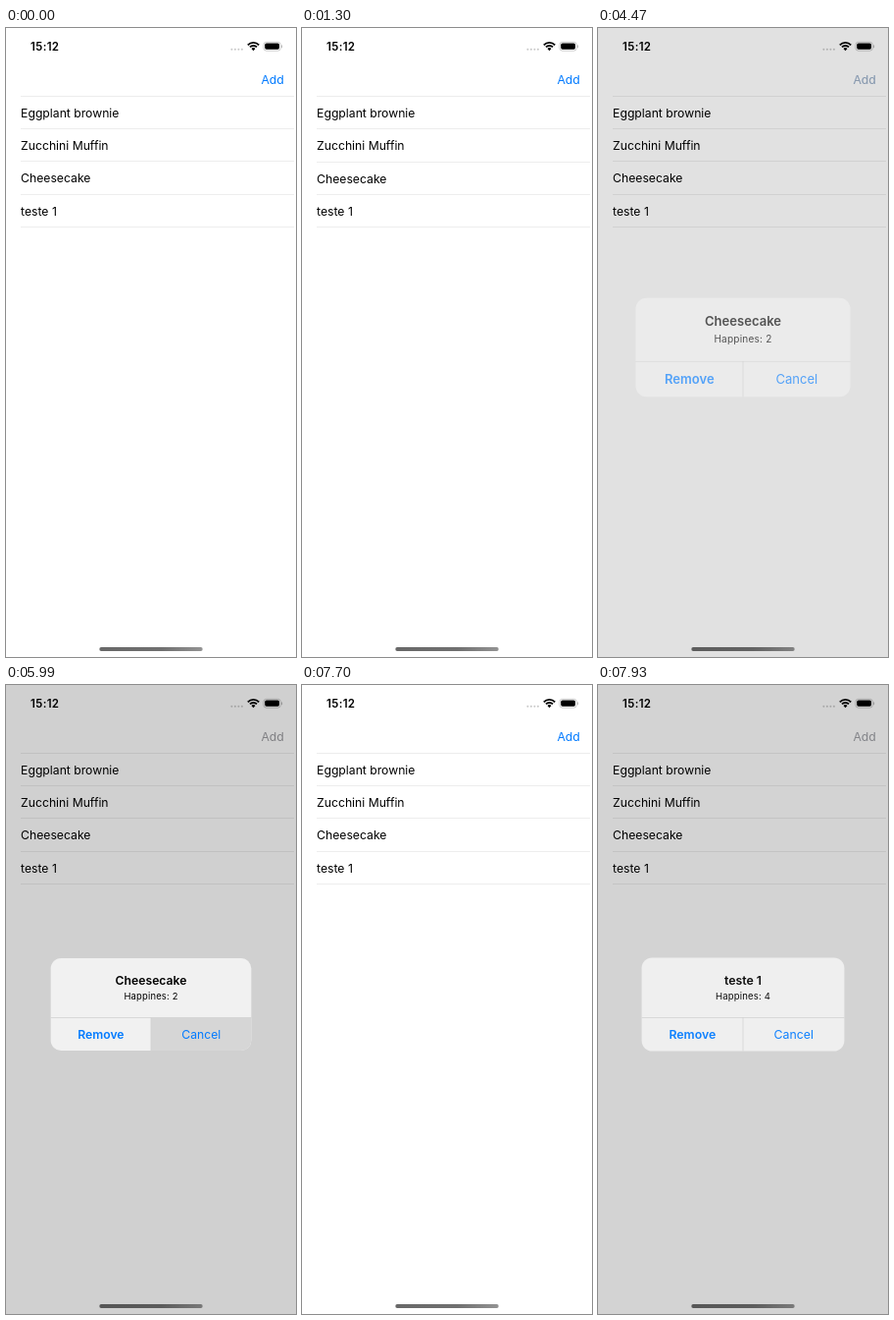
Write an HTML page with a canvas that moves like this. It is 296 by 640 pixels and loops after 8000 ms.

```html
<!DOCTYPE html>
<html lang="en">
<head>
<meta charset="utf-8">
<title>Cake list</title>
<style>
  html, body { margin: 0; width: 100%; height: 100%; overflow: hidden; background: #fff; }
  canvas { display: block; width: 296px; height: 640px; }
</style>
</head>
<body>
<canvas id="stage"></canvas>
<script>
const W = 296, H = 640, LOOP = 8000;
const BLUE = '#007aff', TOP = 69.05, ROW = 33.36, TEXT = 12.2;
const items = ['Eggplant brownie', 'Zucchini Muffin', 'Cheesecake', 'teste 1'];

const canvas = document.getElementById('stage');
const ctx = canvas.getContext('2d');
const dpr = window.devicePixelRatio || 1;
canvas.width = W * dpr;
canvas.height = H * dpr;

// Remaining distance of a critically damped spring, 1 down to 0.
function spring(ms, speed) {
  const x = Math.max(0, ms) / 1000 * speed;
  return (1 + x) * Math.exp(-x);
}

// Holds time on evenly spaced steps, as a screen recording does.
function hold(t, start, end, steps) {
  const gap = (end - start) / (steps - 1);
  return Math.min(end, start + Math.floor((t - start) / gap + 1e-6) * gap);
}

function label(str, x, y, { size = TEXT, weight = 400, color = '#000', align = 'left', spacing = 0 } = {}) {
  ctx.font = `${weight} ${size}px Inter, sans-serif`;
  ctx.letterSpacing = spacing + 'px';
  ctx.textAlign = align;
  ctx.fillStyle = color;
  ctx.fillText(str, x, y);
}

function box(x, y, w, h, r, color) {
  ctx.fillStyle = color;
  ctx.beginPath();
  ctx.roundRect(x, y, w, h, r);
  ctx.fill();
}

function pullOffset(t) {
  if (t < 500 || t >= 3810) return 0;
  const s = hold(t, 500, 1300, 8), release = 843;
  if (s < release) return 58 * Math.sin((s - 420) / (release - 420) * Math.PI / 2);
  return 58 * spring(s - release, 15);
}

function pressedRow(t) {
  if (t >= 3810 && t < 4230) return 2;
  if (t >= 7330 && t < 7700) return 3;
  return -1;
}

function alertState(t) {
  if (t >= 4470 && t < 6100) {
    const rest = spring(hold(t, 4470, 4800, 4) - 4360, 20);
    return { title: items[2], score: 2, alpha: 1 - rest, scale: 1 + 0.2 * rest, pressed: t >= 5990 };
  }
  if (t >= 6100 && t < 6430) {
    const alpha = spring(hold(t, 6100, 6430, 4) - 6050, 20);
    return { title: items[2], score: 2, alpha, scale: 1, pressed: true };
  }
  if (t >= 7810) {
    const rest = spring(hold(t, 7810, 7930, 2) - 7700, 20);
    return { title: items[3], score: 4, alpha: 1 - rest, scale: 1 + 0.2 * rest, pressed: false };
  }
  return null;
}

function drawStatusBar() {
  label('15:12', 39.7, 23, { size: 11.5, weight: 600, align: 'center', spacing: 0.35 });
  for (let i = 0; i < 4; i++) box(229.4 + i * 3.5, 20.8, 2, 2, 1, '#c8c8c8');

  ctx.strokeStyle = '#000';
  ctx.lineWidth = 1.8;
  for (const r of [8.1, 5]) {
    ctx.beginPath();
    ctx.arc(252.5, 23, r, -Math.PI * 0.75, -Math.PI * 0.25);
    ctx.stroke();
  }
  ctx.fillStyle = '#000';
  ctx.beginPath();
  ctx.moveTo(252.5, 23.2);
  ctx.arc(252.5, 23, 2.8, -Math.PI * 0.75, -Math.PI * 0.25);
  ctx.fill();

  ctx.strokeStyle = '#bbb';
  ctx.lineWidth = 0.8;
  ctx.beginPath();
  ctx.roundRect(262.9, 14.3, 17.4, 8.8, 2.8);
  ctx.stroke();
  box(264.2, 15.6, 14.8, 6.2, 1.7, '#000');
  box(281.1, 17.2, 1, 3, 0.5, '#bbb');
}

function drawHomeBar() {
  const shade = ctx.createLinearGradient(95, 0, 201, 0);
  shade.addColorStop(0, '#686868');
  shade.addColorStop(0.6, '#707070');
  shade.addColorStop(1, '#949494');
  box(95.3, 630.1, 105.4, 3.8, 1.9, shade);
}

function drawList(offset, pressed) {
  for (let i = 0; i <= items.length; i++) {
    ctx.fillStyle = '#ededed';
    ctx.fillRect(15, Math.floor(TOP + ROW * i + offset), 279, 1);
  }
  if (pressed >= 0) {
    const y = Math.floor(TOP + ROW * pressed + 0.3);
    ctx.fillStyle = '#d3d3d6';
    ctx.fillRect(0, y, W, Math.floor(TOP + ROW * (pressed + 1) + 0.3) - y);
    ctx.fillStyle = '#fff';
    ctx.fillRect(0, y - 1, W, 1);
  }
  items.forEach((name, i) => label(name, 15.1, TOP + ROW * (i + 0.5) + 4.9 + offset));
}

function drawAlert({ title, score, alpha, scale, pressed }) {
  ctx.save();
  ctx.globalAlpha = alpha;
  ctx.translate(148, 325);
  ctx.scale(scale, scale);
  ctx.translate(-148, -325);

  box(45.7, 278, 204.6, 94, 10.6, '#f1f1f1');
  if (pressed) box(148, 338.5, 102.3, 33.5, [0, 0, 10.6, 0], '#d6d6d6');
  ctx.fillStyle = '#d2d2d2';
  ctx.fillRect(45.7, 338, 204.6, 0.8);
  ctx.fillRect(147.6, 338, 0.8, 34);

  const mid = { align: 'center' };
  label(title, 148, 304.8, { ...mid, weight: 600 });
  label('Happines: ' + score, 148, 320.5, { ...mid, size: 9.4, spacing: 0.2 });
  label('Remove', 96.9, 360, { ...mid, weight: 600, color: BLUE });
  label('Cancel', 199.2, 360, { ...mid, color: BLUE });
  ctx.restore();
}

function draw(t) {
  const alert = alertState(t);
  ctx.setTransform(dpr, 0, 0, dpr, 0, 0);
  ctx.fillStyle = '#fff';
  ctx.fillRect(0, 0, W, H);

  drawStatusBar();
  drawHomeBar();
  drawList(pullOffset(t), pressedRow(t));

  ctx.globalAlpha = alert ? 1 - alert.alpha : 1;
  label('Add', 260.4, 56.7, { color: BLUE });
  if (alert) {
    ctx.globalAlpha = alert.alpha;
    label('Add', 260.4, 56.7, { color: '#9c9ca0' });
    ctx.fillStyle = 'rgba(0, 0, 0, 0.185)';
    ctx.fillRect(0, 0, W, H);
    drawAlert(alert);
  }
  ctx.globalAlpha = 1;
}

const start = performance.now();
function tick() {
  draw((performance.now() - start) % LOOP);
  requestAnimationFrame(tick);
}
tick();
</script>
</body>
</html>
```
